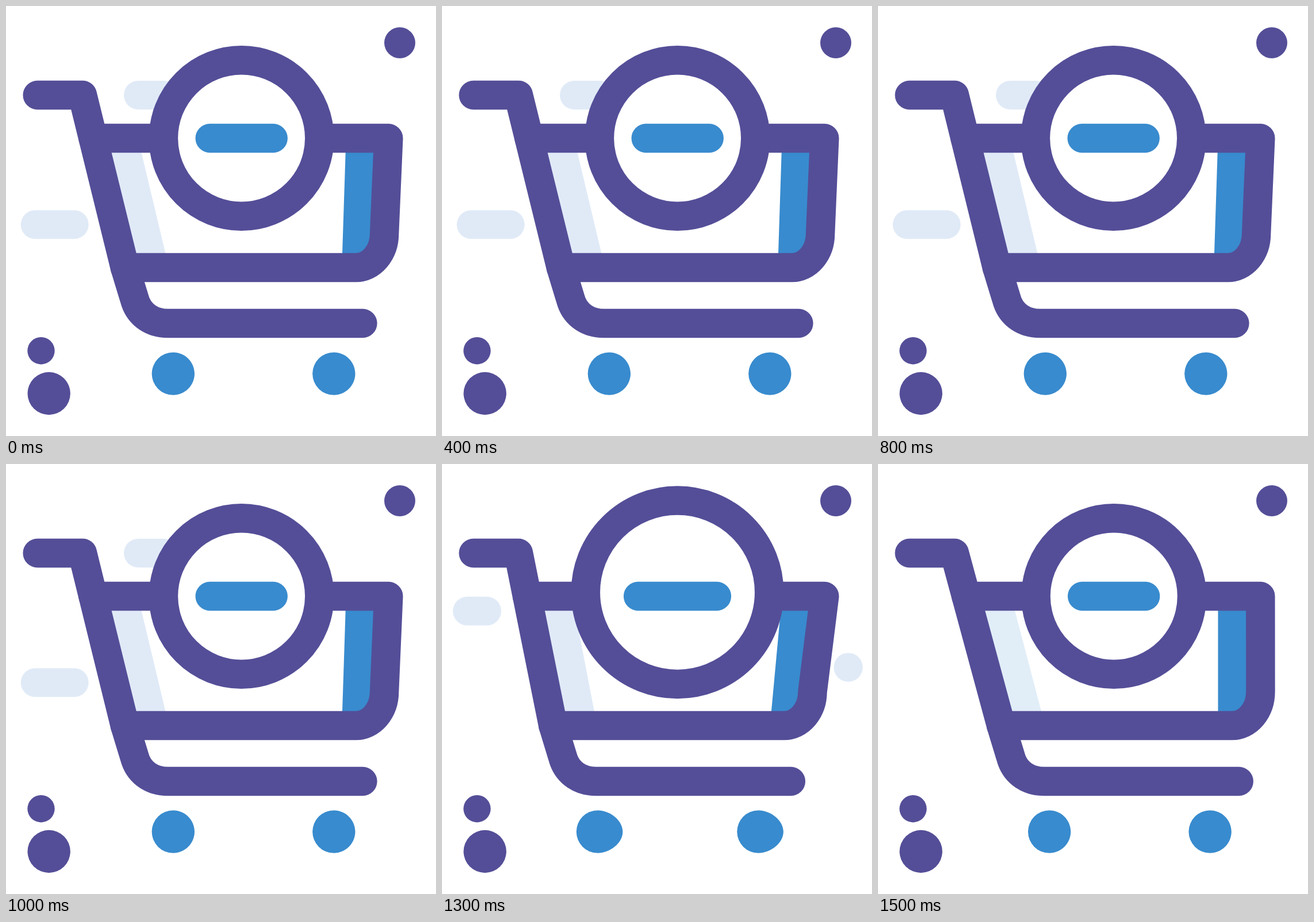
Animation of 748 by 748 pixels, one loop 1.6 s. Source, as an HTML page:

```html
<!DOCTYPE html>
<html lang="en">
<head>
<meta charset="utf-8">
<title>Shopping cart</title>
<style>
  html, body { margin: 0; width: 100%; height: 100%; overflow: hidden; background: #fff; }
  svg { display: block; width: 100%; height: 100%; }
  .line { fill: none; stroke: #544e98; stroke-width: 50.5; stroke-linecap: round; stroke-linejoin: round; }
  .dot { fill: #544e98; }
  .blue { fill: #388bce; }
  .pale { fill: #e0eaf7; }
</style>
</head>
<body>
<svg viewBox="0 0 748 748">
  <circle class="dot" cx="685" cy="64" r="27"/>
  <circle class="dot" cx="61" cy="599.7" r="23.7"/>
  <circle class="dot" cx="74.7" cy="674" r="37.2"/>
  <g id="streaks" class="pale"></g>
  <path id="shade" class="pale"/>
  <path id="panel" class="blue"/>
  <path id="frame" class="line"/>
  <path id="basket" class="line"/>
  <circle id="ring" class="line" style="fill:#fff"/>
  <rect id="minus" class="blue" y="204.8" height="50.4" rx="25.2"/>
  <path id="wheels" class="blue"/>
</svg>
<script>
const STEP = 100, STEPS = 16;

// lean: sideways shift of the cart's lower part; bulge: wheel stretch
// ring: cx, cy, r; minus and streaks: x, width (streaks also y)
const roll = { lean: -7.3, bulge: 0, ring: [409.6, 230, 135.7], minus: [329.5, 160.4],
  streaks: [[205, 130, 95], [25.7, 355.2, 118]], pale: '#e0eaf7' };
const push = { lean: -20.9, bulge: 6.3, ring: [409.5, 223.2, 159.7], minus: [315.9, 187.2],
  streaks: [[19, 230.8, 84], [681.5, 328.7, 50.4]], pale: '#e0eaf7' };
const rest = { lean: 0, bulge: 0, ring: [410.3, 230, 135.7], minus: [330, 160.4],
  streaks: [], pale: '#e1eef8' };

const $ = id => document.getElementById(id);
const set = (id, attrs) => {
  for (const key in attrs) $(id).setAttribute(key, attrs[key]);
};

function wheel(cx, bulge) {
  const r = 37.2, k = 20.5, y = 639.6;
  const x = cx - bulge, right = x + r + bulge;
  return `M${x} ${y - r}C${x + k} ${y - r} ${right} ${y - k} ${right} ${y}` +
    `C${right} ${y + k} ${x + k} ${y + r} ${x} ${y + r}A${r} ${r} 0 0 1 ${x} ${y - r}Z`;
}

function draw({ lean, bulge, ring, minus, streaks, pale }) {
  const low = x => x + lean;
  const postX = 153.3 + lean / 4;

  $('streaks').innerHTML = streaks.map(([x, y, w]) =>
    `<rect x="${x}" y="${y}" width="${w}" height="50" rx="25"/>`).join('');

  set('shade', { d: `M${postX} 230H${231.5 + lean / 4}L${low(290.6)} 455H${low(214.2)}Z` });
  $('shade').style.fill = pale;
  set('panel', { d: `M591.5 230H665L${low(660)} 396L${low(616)} 455H${low(591.5)}Z` });

  set('frame', { d: `M54.7 155H133L${low(214.2)} 455L${low(232.2)} 514` +
    `C${low(240.5)} 538 ${low(262)} 552 ${low(288.5)} 552H${low(627.7)}` });
  set('basket', { d: `M${postX} 230H665.3L${low(665.4)} 396` +
    `A49.4 59 0 0 1 ${low(616)} 455H${low(214.2)}` });

  set('ring', { cx: ring[0], cy: ring[1], r: ring[2] });
  set('minus', { x: minus[0], width: minus[1] });
  set('wheels', { d: wheel(low(298.1), bulge) + wheel(low(577.6), bulge) });
}

function poseAt(step) {
  if (step === STEPS - 1) return rest;
  return step % 2 ? push : roll;
}

let shown;
function tick() {
  const pose = poseAt(Math.floor(performance.now() / STEP) % STEPS);
  if (pose !== shown) draw(shown = pose);
  requestAnimationFrame(tick);
}
tick();
</script>
</body>
</html>
```
